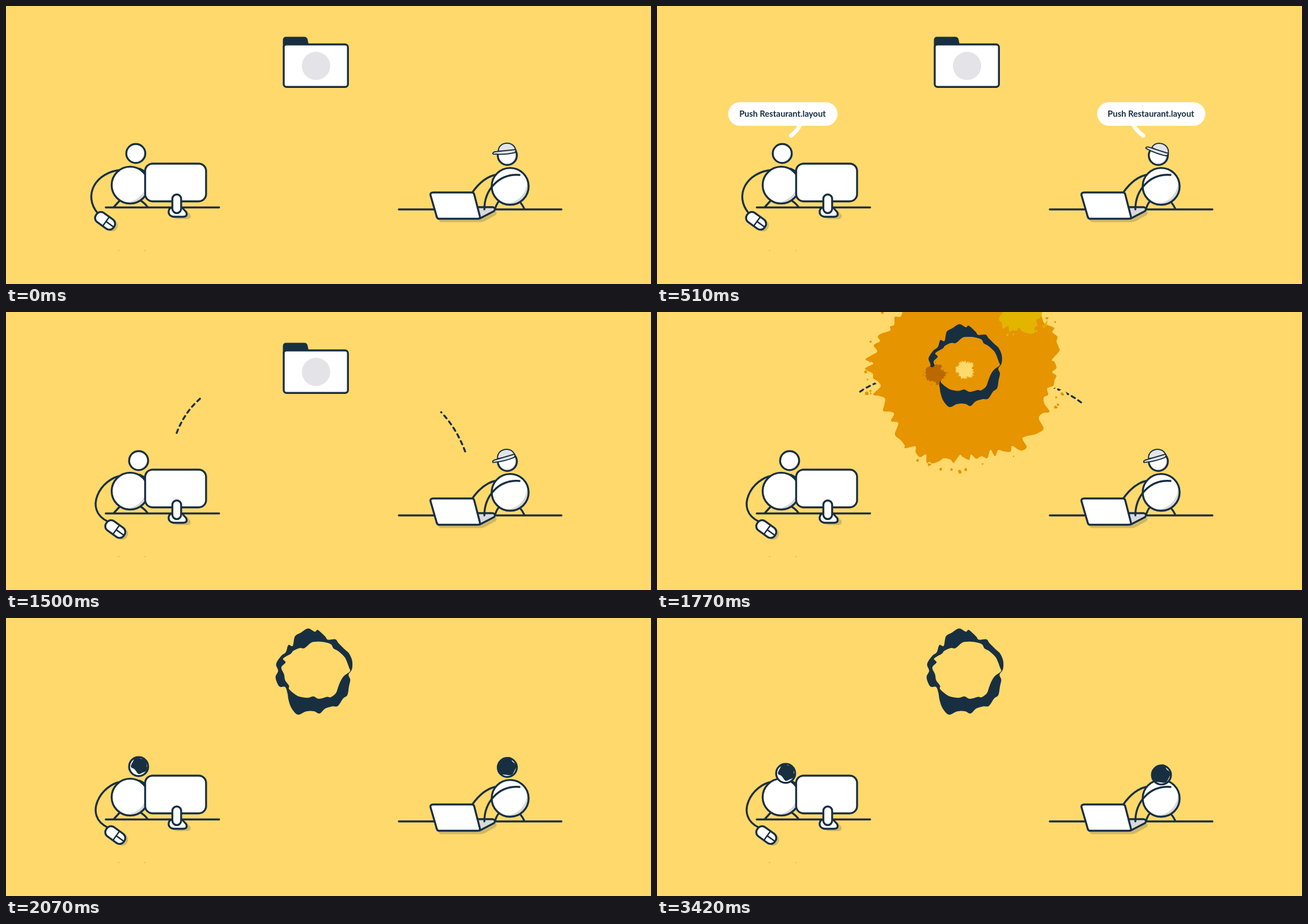
An HTML page for the animation above (3510 ms loop, 1138 by 492 pixels).

```html
<!DOCTYPE html>
<html lang="en">
<head>
<meta charset="utf-8">
<title>Push conflict</title>
<style>
  html, body { margin: 0; height: 100%; overflow: hidden; background: #ffd96b; }
  svg { display: block; width: 100vw; height: 100vh; }
  .ink { fill: none; stroke: #182f42; stroke-width: 3.4; stroke-linecap: round; stroke-linejoin: round; }
  .w, .ink.w { fill: #fff; }
  .g { fill: #d9d9db; stroke: none; }
  .shade { fill: #182f42; stroke: none; opacity: .2; }
  .soot { fill: #182f42; stroke: none; }
  .tail { fill: none; stroke: #fff; stroke-width: 7; stroke-linecap: round; }
  text { font: 700 14.5px Lato, "Open Sans", sans-serif; fill: #182f42; text-anchor: middle; }
</style>
</head>
<body>
<svg viewBox="0 0 1138 492">
  <defs>
    <g id="head" class="ink">
      <circle class="w" r="16.8" stroke="none"/>
      <path class="g" d="M14.5-8.4A16.8 16.8 0 0 1-6.6 15.5A19.3 19.3 0 0 0 14.5-8.4"/>
      <circle r="16.8"/>
    </g>
    <g id="torso" class="ink">
      <circle class="w" r="32.6" stroke="none"/>
      <path class="g" d="M28.2-16.3A32.6 32.6 0 0 1-12.7 30A37.5 37.5 0 0 0 28.2-16.3"/>
      <circle r="32.6"/>
    </g>
    <path id="base" d="M293 357H311L318 365Q321 373 312 373H295Q286 371 287 363Q288 357 293 357Z"/>
    <path id="wayL" d="M288 280C295 152 384 108 488 106"/>
    <path id="wayR" d="M827 312C804 172 727 122 605 117"/>
  </defs>

  <path fill="#d9b65a" d="M197.500 432h2.500v1.500h-2.500zM244 432h2.500v1.500h-2.500z"/>
  <path id="dashes" class="ink"/>

  <g id="folder">
    <path fill="#182f42" d="M488.500 74V60Q489 54.500 494 54.500H526Q531 54.500 532 59L534 68V74Z"/>
    <rect class="ink w" x="490" y="68" width="113.300" height="75.300" rx="5"/>
    <circle cx="547" cy="106" r="25" fill="#e4e4e8"/>
  </g>

  <g class="ink">
    <path d="M176 356.500H376M201 344L190 356M237 344Q245 349 250 356M236 288L247 294"/>
    <path id="arm"/>
    <g id="mouse">
      <rect class="shade" x="-19" y="-10" width="38" height="20" rx="9" transform="translate(5 3) rotate(36)"/>
      <g transform="rotate(36)">
        <rect class="w" x="-19" y="-10" width="38" height="20" rx="9"/>
        <path stroke-width="2.500" d="M2-9V9M2 0H18"/>
      </g>
    </g>
    <use href="#torso" x="219" y="317"/>
    <g id="manL"><use href="#head"/><path id="sootL" class="soot"/></g>
    <rect class="w" x="245.500" y="279" width="107.500" height="66.700" rx="13"/>
    <use href="#base" class="shade" x="7" y="4"/>
    <use href="#base" class="w"/>
    <rect class="w" x="293.500" y="333.500" width="15.500" height="33" rx="7.700"/>
  </g>

  <g class="ink">
    <path d="M693 360H980M870 345Q865 351 863 359M907 347Q912 353 915 360M867 298C848 301 833 315 822 331"/>
    <path class="shade" d="M757 372L766 382.500H838Q842 382 846 380L864 370Q868 366 862 360L836 374Z"/>
    <path fill="#d9d9db" d="M830 356H859Q865 358 861 363L836 376L826 374Z"/>
    <path class="w" d="M754 330H822Q825 330 826 333L836 372Q837 376.500 832 376.500H764Q761 376.500 760 373L749 335Q748 330 754 330Z"/>
    <use href="#torso" x="889.500" y="319.200"/>
    <g id="manR">
      <use href="#head"/>
      <path id="sootR" class="soot"/>
      <g id="cap" fill="#e3e4e8" stroke-width="2">
        <path d="M-16-8C-15-26 14-27 15-7Z"/>
        <path d="M15-10.500L-22-6.500Q-27-5-25-2.500Q-4-1 13-5Q16-8 15-10.500Z"/>
      </g>
    </g>
    <path d="M906 299C870 296 844 325 844 360"/>
  </g>

  <g id="sayL">
    <path class="tail" d="M252 210Q246 222 236 229"/>
    <rect class="w" x="128" y="171" width="188" height="41" rx="20.500"/>
    <text x="221.500" y="196.500">Push Restaurant.layout</text>
  </g>
  <g id="sayR">
    <path class="tail" d="M841 210Q847 221 858 229"/>
    <rect class="w" x="779" y="171" width="186" height="41" rx="20.500"/>
    <text x="871.500" y="196.500">Push Restaurant.layout</text>
  </g>

  <g fill-rule="evenodd">
    <path id="orange" fill="#e69400" stroke="#ffd96b" stroke-width="9" paint-order="stroke"/>
    <path id="scorch" fill="#182f42"/>
    <path id="olive" fill="#e3b500"/>
    <path id="brown" fill="#bc6800"/>
  </g>
</svg>

<script>
const LOOP = 3510;
const $ = id => document.getElementById(id);
const set = (id, name, value) => $(id).setAttribute(name, value);
const show = (id, on) => set(id, 'visibility', on ? 'visible' : 'hidden');
const span = (t, a, b) => Math.max(0, Math.min(1, (t - a) / (b - a)));
const smooth = p => p * p * (3 - 2 * p);
const mix = (a, b, p) => a + (b - a) * p;
const rnd = n => { const x = Math.sin(n * 127.1 + 3.7) * 43758.5453; return x - Math.floor(x); };

// closed smooth curve through points
function curve(pts) {
  const n = pts.length, at = i => pts[(i + n) % n];
  let d = 'M' + pts[0];
  for (let i = 0; i < n; i++) {
    const [a, b, c, e] = [at(i - 1), at(i), at(i + 1), at(i + 2)];
    const h = k => [b[k] + (c[k] - a[k]) / 6, c[k] - (e[k] - b[k]) / 6];
    const [x1, x2] = h(0), [y1, y2] = h(1);
    d += `C${[x1, y1, x2, y2, c[0], c[1]].map(v => v.toFixed(1))}`;
  }
  return d + 'Z';
}

// circle with an uneven edge, stretched upright by tall
function ragged(x, y, r, n, amp, seed, tall = 1) {
  const a = Math.min(amp, r * .25), pts = [];
  for (let i = 0; i < n; i++) {
    const th = (i + .6 * rnd(seed + i)) / n * 2 * Math.PI;
    const q = r + a * (rnd(seed + i * 3 + 50) * 1.4 - .7 + .5 * Math.sin(th * 5 + seed));
    pts.push([x + q * Math.cos(th), y + q * tall * Math.sin(th)]);
  }
  return curve(pts);
}

// ragged ring with loose drops beside both edges
function splat(x, y, R, hy, r, n, amp, seed) {
  if (R < 1 || r >= R - 2) return '';
  let d = ragged(x, y, R, n, amp, seed);
  if (r > 1) d += ragged(x, hy, r, Math.round(n * .8), amp, seed + 7);
  for (let i = 0; i < n / 3; i++) {
    const out = i % 2 || r < 60, th = rnd(seed + i * 11) * 2 * Math.PI;
    const gap = Math.min(amp, R * .2) * (.5 + rnd(i + seed));
    const q = out ? R + gap : r - gap;
    const size = gap * (.08 + .2 * rnd(i * 5 + seed));
    d += ragged(x + q * Math.cos(th), (out ? y : hy) + q * Math.sin(th), size, 6, size, seed + i);
  }
  return d;
}

// dashes fixed on a path, visible only from tail to lead
function trail(way, tail, lead) {
  const point = s => { const p = way.getPointAtLength(s); return p.x.toFixed(1) + ' ' + p.y.toFixed(1); };
  lead = Math.min(lead, way.getTotalLength());
  let d = '';
  for (let s = 0; s < lead; s += 13.5) {
    const a = Math.max(s, tail), b = Math.min(s + 6.5, lead);
    if (b > a) d += `M${point(a)}L${point(b)}`;
  }
  return d;
}

set('scorch', 'd', ragged(544, 97, 64, 38, 7, 4, 1.15) + ragged(545, 93, 56, 32, 7, 15, .88));
set('sootL', 'd', ragged(2, -2.5, 14, 11, 2.5, 5));
set('sootR', 'd', ragged(-1.5, -1.5, 16, 13, 2, 8));

function bubble(id, x, t, fadeAt) {
  const u = Math.max(0, t - 60);
  const s = u > 480 ? 1 : 1 - Math.exp(-.008 * u) * Math.cos(Math.PI * u / 150);
  const sy = s < 1 ? s : 1 + (s - 1) * .7;
  set(id, 'transform', `translate(${x} 212) scale(${s} ${sy}) translate(${-x} -212)`);
  set(id, 'opacity', 1 - span(t, fadeAt, fadeAt + 280));
}

function people(t) {
  const up = smooth(span(t, 0, 450)), back = smooth(span(t, 900, 1350));
  const sinkL = smooth(span(t, 2250, 3330)), sinkR = span(t, 2250, 3420) ** 1.6;
  set('manL', 'transform', `translate(${229 - 8 * up + 13 * back - 7 * sinkL} ${261 + 2 * back + 12 * sinkL})`);
  set('manR', 'transform', `translate(${884.5 + 5.5 * sinkR} ${264.5 + 13.3 * sinkR})`);
  set('cap', 'transform', `rotate(${24 * up - 34 * back})`);
  show('cap', t < 1980);
  const soot = smooth(span(t, 1920, 2040));
  for (const id of ['sootL', 'sootR']) set(id, 'transform', `scale(${soot})`);

  const m = smooth(span(t, 1110, 1470));
  const x = mix(162, 180, m), y = mix(367, 371, m);
  set('arm', 'd', `M203 290C${mix(158, 168, m)} 294 135 ${mix(335, 350, m)} ${x} ${y}`);
  set('mouse', 'transform', `translate(${x + 12.8} ${y + 13.2})`);
}

function explosion(t) {
  const grow = (a, b, max, pow = 1) => max * (1 - (1 - span(t, a, b)) ** pow);
  show('folder', t < 1770);
  set('orange', 'd', splat(543, 104, grow(1640, 2040, 392, 1.33), 102, grow(1760, 2040, 392), 120, 14, 4));
  set('olive', 'd', splat(641, -6, grow(1700, 1990, 108, 1.7), 0, grow(1780, 1990, 108), 44, 9, 21));
  set('brown', 'd', splat(491, 109, grow(1740, 2030, 86, 1.9), 106, grow(1865, 2030, 92), 44, 7, 33));
  const z = grow(1650, 1800, 1, 2);
  set('scorch', 'transform', `translate(545 97) scale(${z}) translate(-545 -97)`);
}

function draw(t) {
  bubble('sayL', 222, t, 1070);
  bubble('sayR', 872, t, 1010);
  people(t);
  const lead = 149 * (Math.max(0, t - 614) / 886) ** 2;
  const tail = 66 * (Math.max(0, t - 1054) / 446) ** 2;
  set('dashes', 'd', trail($('wayL'), tail * .95, lead * .95) + trail($('wayR'), tail, lead));
  explosion(t);
}

function tick() {
  draw(performance.now() % LOOP);
  requestAnimationFrame(tick);
}
tick();
</script>
</body>
</html>
```
